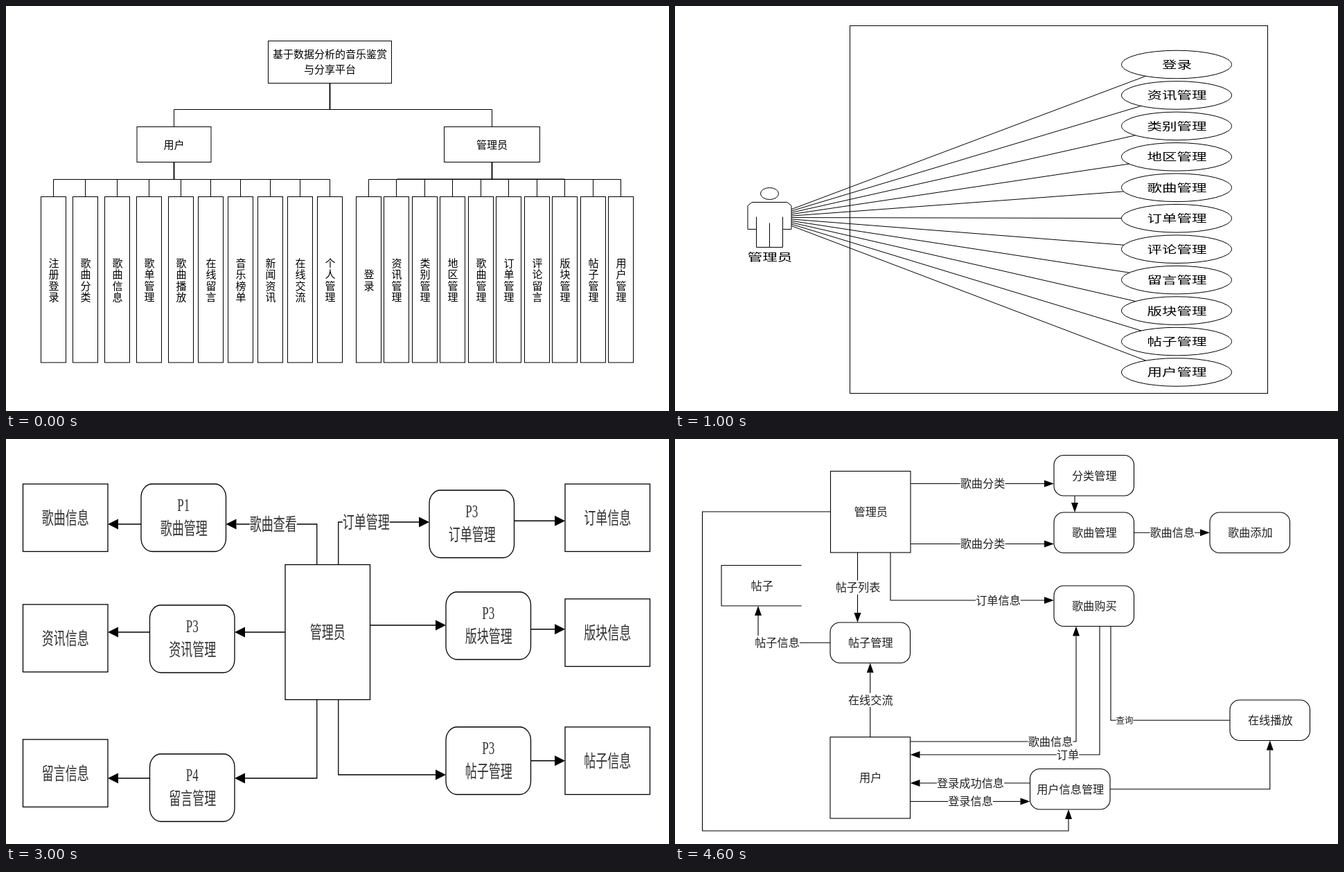
An HTML page that plays this animation: 957 by 585 pixels, repeating every 5000 ms.

```html
<!DOCTYPE html>
<html lang="zh-CN">
<head>
<meta charset="utf-8">
<title>系统设计图</title>
<style>
html, body { margin: 0; width: 100%; height: 100%; overflow: hidden; background: #fff; }
svg { display: block; }
g { fill: none; stroke: #000; }
rect, ellipse { fill: #fff; }
path, ellipse { vector-effect: non-scaling-stroke; }
text { fill: #000; stroke: none; text-anchor: middle; font-family: "Noto Sans CJK SC", "Noto Sans CJK", sans-serif; }
.bold { stroke-width: 1.3; }
.bold text { fill: #333; font-family: "Liberation Serif", "Noto Sans CJK SC", "Noto Sans CJK", serif; }
.soft { stroke-width: 1.1; }
.soft text { fill: #222; }
.trunk { stroke-width: 1.8; }
.label { stroke: none; }
.head { fill: #000; stroke: none; }
</style>
</head>
<body>
<svg id="stage" width="957" height="585" viewBox="0 0 957 585"></svg>
<script>
const text = (x, y, str, size, sx = 1) =>
  `<text transform="translate(${x} ${y + size * 0.37}) scale(${sx} 1)" font-size="${size}">${str}</text>`;
const rect = (x, y, w, h, rx = 0, ry = rx) =>
  `<rect x="${x}" y="${y}" width="${w}" height="${h}" rx="${rx}" ry="${ry}"/>`;
const path = (d, cls = "") => `<path class="${cls}" d="${d}"/>`;
const ellipse = (cx, cy, rx, ry) => `<ellipse cx="${cx}" cy="${cy}" rx="${rx}" ry="${ry}"/>`;

// Text on a white strip that interrupts the line below it.
const note = (x, y, str, size, sx = 1) => {
  const w = str.length * size * sx, h = size + 4;
  return `<rect class="label" x="${x - w / 2}" y="${y - h / 2}" width="${w}" height="${h}"/>` +
    text(x, y, str, size, sx);
};

// Polyline through x,y pairs, ending in a solid arrowhead.
function arrow(pts, len, half) {
  const [px, py, x, y] = pts.slice(-4);
  const dx = Math.sign(x - px), dy = Math.sign(y - py);
  const bx = x - dx * len, by = y - dy * len;
  const ox = dy * half, oy = dx * half;
  return path("M" + [...pts.slice(0, -2), bx, by].join(" ")) +
    path(`M${x} ${y}L${bx + ox} ${by + oy}L${bx - ox} ${by - oy}Z`, "head");
}

function branch(x, y, w, name, leftOf, leaves) {
  const items = leaves.split(" ");
  const mid = i => leftOf(i) + 18;
  let out = path(`M${mid(0)} 250H${mid(items.length - 1)}`) + path(`M${x} 225V250`, "trunk") +
    rect(x - w / 2, y, w, 51) + text(x, y + 25.5, name, 15);
  items.forEach((leaf, i) => {
    out += path(`M${mid(i)} 250V275`) + rect(leftOf(i), 275, 36, 239.5);
    [...leaf].forEach((ch, k) => {
      out += text(mid(i) + 0.5, 395.5 + (k - (leaf.length - 1) / 2) * 16.6, ch, 15);
    });
  });
  return out;
}

function structure() {
  return path("M467 111V149", "trunk") + path("M242 174V149H701V174") +
    rect(378, 50, 178, 61) + text(467, 69, "基于数据分析的音乐鉴赏", 15) + text(467, 90.5, "与分享平台", 15) +
    branch(242, 174, 107, "用户", i => 50 + 46 * i - 3 * Math.max(0, i - 4),
      "注册登录 歌曲分类 歌曲信息 歌单管理 歌曲播放 在线留言 音乐榜单 新闻资讯 在线交流 个人管理") +
    branch(701, 174, 138, "管理员", i => Math.round(505 + 40.45 * i),
      "登录 资讯管理 类别管理 地区管理 歌曲管理 订单管理 评论留言 版块管理 帖子管理 用户管理") +
    path("M564 249.5H806");
}

function useCase({ frame, x, y, sx, sy, actor, cx, rx, ry, top, step, names }) {
  const edge = 31.5 * sx, size = ry * 0.72;
  let links = "", bubbles = "";
  names.split(" ").forEach((name, i) => {
    const cy = top + i * step;
    links += path(`M${x + edge} ${y + (cy - y) * edge / (cx - x)}L${cx} ${cy}`);
    bubbles += ellipse(cx, cy, rx, ry) + text(cx + 0.5, cy, name, size, 1.47);
  });
  return rect(...frame) + links + bubbles +
    `<g transform="translate(${x} ${y}) scale(${sx} ${sy})">` + ellipse(0, -34.5, 13, 8.5) +
    path("M-19 17H-31.5V-17L-25.5-22H25.5L31.5-17V17H19M-19-1V43H19V-1M0 8V43") + "</g>" +
    text(x + 0.5, y + 57.5 * sy, actor, size, 1.47);
}

function adminFlow() {
  const W = 122.5, H = 97.5, SIZE = 25, SX = 0.68;
  const hub = { x: 403, y: 181.5, h: 195 };
  const write = (x, y, str) => text(x, y, str, SIZE, SX);
  const box = (x, y, name, h = H) => rect(x, y, W, h) + write(x + W / 2, y + h / 2 - 0.5, name);
  const link = (...pts) => arrow(pts, 15, 7.5);

  // Hub -> process -> store; the top and bottom rows leave the hub vertically.
  function chain(side, row, subject, id, px, py, storeY, lineY, action) {
    const left = side < 0;
    const storeX = left ? 24.5 : 807;
    const near = left ? px + W : px, far = left ? px : px + W;
    const exitX = hub.x + W / 2 + side * 15.5;
    const sideX = left ? hub.x : hub.x + W;
    const outY = left ? lineY : (py + storeY + H) / 2;
    const start = row ? [exitX, row < 0 ? hub.y : hub.y + hub.h, exitX, lineY] : [sideX, lineY];
    return link(...start, near, lineY) + link(far, outY, left ? storeX + W : storeX, outY) +
      rect(px, py, W, H, 16, 19) + write(px + W / 2, py + 29.5, id) +
      write(px + W / 2 + 0.5, py + 64, subject + "管理") + box(storeX, storeY, subject + "信息") +
      (action ? note(exitX + (left ? -63 : 40), lineY, action, SIZE, SX) : "");
  }

  return box(hub.x, hub.y, "管理员", hub.h) +
    chain(-1, -1, "歌曲", "P1", 195, 65, 65, 123, "歌曲查看") +
    chain(-1, 0, "资讯", "P3", 207.5, 240, 239, 279) +
    chain(-1, 1, "留言", "P4", 207.5, 455, 434, 490) +
    chain(1, -1, "订单", "P3", 611, 74, 65, 120, "订单管理") +
    chain(1, 0, "版块", "P3", 635, 221, 231, 269) +
    chain(1, 1, "帖子", "P3", 635, 416, 416, 485);
}

function dataFlow() {
  const SIZE = 16.2, W = 115.5;
  const node = (x, y, name, h = 58.5, r = 14) => ({
    x, y, name, h, r, right: x + W, bottom: y + h, cx: x + W / 2, cy: y + h / 2
  });
  const actor = (x, y, name) => node(x, y, name, 117.5, 0);

  const admin = actor(224.5, 46.5, "管理员"), user = actor(224, 430.5, "用户");
  const posts = node(224, 265, "帖子管理"), sorting = node(547, 23.5, "分类管理");
  const songs = node(547, 106, "歌曲管理"), adding = node(772, 106, "歌曲添加");
  const buying = node(547, 212, "歌曲购买"), playing = node(801, 377, "在线播放");
  const account = node(512.5, 476.5, "用户信息管理");
  const store = node(67, 182.5, "帖子");

  const link = (...pts) => arrow(pts, 14, 5);
  const say = (x, y, str, size = SIZE) => note(x, y, str, size);
  const across = (a, b, y, str) => {
    const [from, to] = a.x < b.x ? [a.right, b.x] : [a.x, b.right];
    return link(from, y, to, y) + say((from + to) / 2 + 0.5, y, str);
  };
  const upDown = (a, b, x, str = "") => {
    const [from, to] = a.y < b.y ? [a.bottom, b.y] : [a.y, b.bottom];
    return link(x, from, x, to) + (str && say(x + 0.5, (from + to) / 2, str));
  };

  const bends =
    link(311, admin.bottom, 311, 233, buying.x, 233) +
    link(posts.x, posts.cy, 120, posts.cy, 120, store.bottom) +
    link(user.right, 437, 579, 437, 579, buying.bottom) +
    link(613, buying.bottom, 613, 456, user.right, 456) +
    link(account.right, account.cy, playing.cx, account.cy, playing.cx, playing.bottom) +
    link(admin.x, 105, 39.5, 105, 39.5, 566, 568, 566, 568, account.bottom) +
    path(`M${playing.x} ${playing.cy}H629V${buying.bottom}`) +
    path(`M${store.right} ${store.y}H${store.x}V${store.bottom}H${store.right}`);
  const nodes = [admin, user, posts, sorting, songs, adding, buying, playing, account]
    .map(n => rect(n.x, n.y, W, n.h, n.r) + text(n.cx + 0.5, n.cy, n.name, SIZE)).join("");

  return bends + nodes + text(store.cx + 1, store.cy, store.name, SIZE) +
    across(admin, sorting, 64.5, "歌曲分类") + across(admin, songs, 151.5, "歌曲分类") +
    across(songs, adding, songs.cy, "歌曲信息") +
    across(account, user, 497, "登录成功信息") + across(user, account, 523.5, "登录信息") +
    upDown(sorting, songs, 577) + upDown(admin, posts, 263.5, "帖子列表") +
    upDown(user, posts, posts.cx, "在线交流") +
    say(466.5, 233, "订单信息") + say(147.5, posts.cy, "帖子信息") +
    say(542, 437, "歌曲信息") + say(567, 456, "订单") + say(649, playing.cy, "查询", 12.5);
}

// Class, pixel offset and content of each one-second scene.
const scenes = [
  ["", 0.5, structure()],
  ["", 0.5, useCase({
    frame: [252, 28, 603, 531], x: 136, y: 305, sx: 1, sy: 1, actor: "管理员",
    cx: 723.5, rx: 79.5, ry: 20.3, top: 84, step: 44.45,
    names: "登录 资讯管理 类别管理 地区管理 歌曲管理 订单管理 评论管理 留言管理 版块管理 帖子管理 用户管理"
  })],
  ["", 0.5, useCase({
    frame: [231, 33, 638, 525], x: 108.5, y: 310, sx: 1.05, sy: 1.075, actor: "用户",
    cx: 729.5, rx: 84, ry: 22, top: 93.5, step: 47.95,
    names: "注册登录 歌曲分类 歌单管理 歌曲信息 歌曲播放 在线留言 音乐榜单 新闻资讯 在线交流 个人管理"
  })],
  ["bold", 0, adminFlow()],
  ["soft", 0, dataFlow()]
];

const stage = document.getElementById("stage");
stage.innerHTML = scenes.map(([cls, offset, body]) =>
  `<g class="${cls}" transform="translate(${offset} ${offset})">${body}</g>`).join("");
const groups = [...stage.children];
const start = performance.now();

function draw() {
  const current = Math.floor((performance.now() - start) / 1000) % groups.length;
  groups.forEach((g, i) => { g.style.display = i === current ? "" : "none"; });
  requestAnimationFrame(draw);
}
draw();
</script>
</body>
</html>
```
